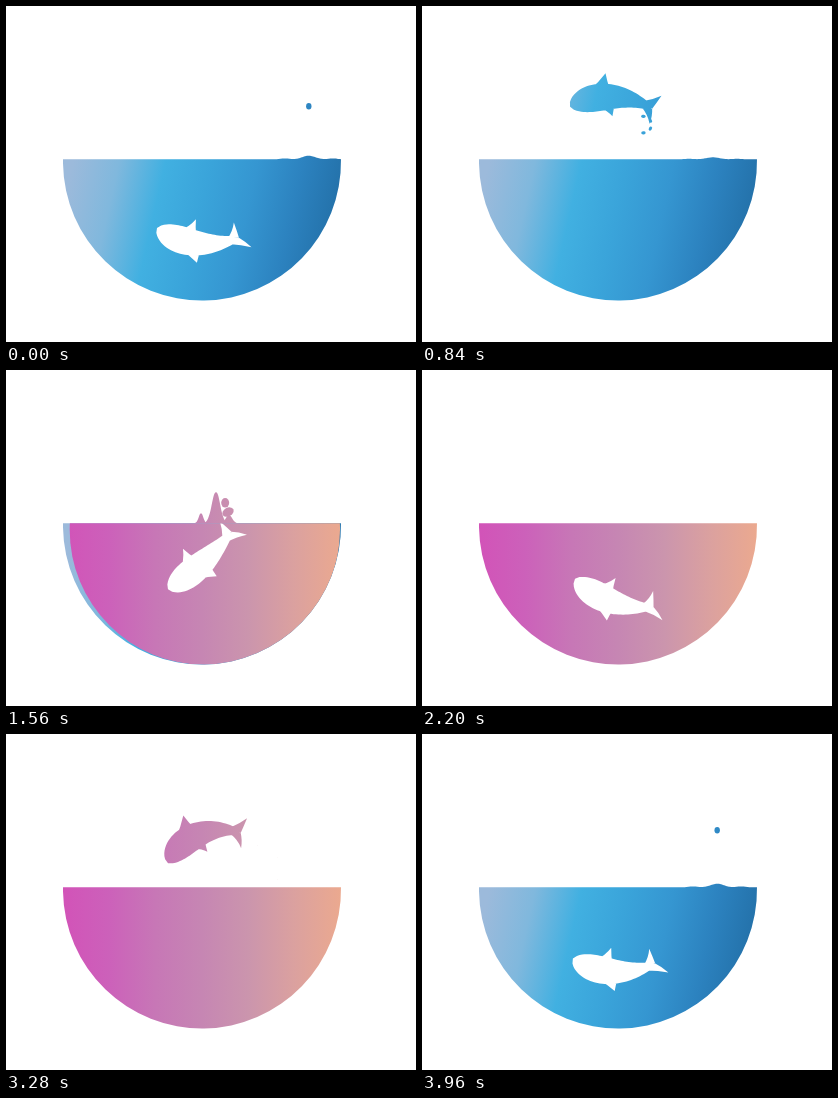
Recreate the animation shown at these times as an HTML page with a canvas. Size 410 by 336 pixels, loop 4000 ms.

```html
<!DOCTYPE html>
<html lang="en">
<head>
<meta charset="utf-8">
<title>Jumping fish</title>
<style>
  html, body { margin: 0; width: 100%; height: 100%; overflow: hidden; background: #fff; }
  canvas { display: block; width: 410px; height: 336px; }
</style>
</head>
<body>
<canvas id="stage" width="410" height="336"></canvas>
<script>
const ctx = document.getElementById('stage').getContext('2d');
const LOOP = 4000, CYCLE = 2000, START = 480;
const BOWL = { x: 196, y: 155.5, r: 139 };
const LEFT = 57, RIGHT = 335, LEVEL = 153.3;
const SPINE = 85;

const clamp = v => Math.max(0, Math.min(1, v));
const lerp = (a, b, p) => a + (b - a) * p;
const bell = (d, width) => Math.exp(-((d / width) ** 2));
const arch = (t, from, length) => Math.sin(Math.PI * clamp((t - from) / length));

// Evenly spaced colours across the bowl, tilted by an angle
function gradient(tilt, ...colors) {
  const c = Math.cos(tilt), s = Math.sin(tilt), width = RIGHT - LEFT;
  const g = ctx.createLinearGradient(LEFT, 200, LEFT + width * c * c, 200 + width * c * s);
  colors.forEach((color, i) => g.addColorStop(i / (colors.length - 1), color));
  return g;
}
const BLUE = gradient(0.22, '#9cbadb', '#80b8dd', '#41b0e1', '#3aa4da', '#3596d1', '#2c82bf', '#2370a8');
const PINK = gradient(0, '#d253b8', '#cc61ba', '#c777b6', '#c686b3', '#cb95ad', '#dba19f', '#eba98f');

// Turning points of the swim: time, nose x, nose y, heading and bend in degrees
const POSES = [
  [480, 153, 148, 41, 0],
  [560, 148, 104, 25, 20],
  [900, 149, 103, -3, 65],
  [1280, 162, 129, -23, 82],
  [1560, 162, 219, -42, -18],
  [1730, 152, 237, -18, -50],
  [2000, 151, 222, 7, -56],
  [2200, 153, 209, 20, -48]
];

function keyPose(i) {
  const n = POSES.length, turn = Math.floor(i / n);
  const [t, ...values] = POSES[i - turn * n];
  return [t + turn * CYCLE, ...values];
}

// Smooth periodic curve through the turning points
function poseAt(t) {
  let i = 0;
  while (t >= keyPose(i + 1)[0]) i++;
  const [before, a, b, after] = [-1, 0, 1, 2].map(step => keyPose(i + step));
  const span = b[0] - a[0], p = (t - a[0]) / span;
  return [1, 2, 3, 4].map(k => {
    const leave = (b[k] - before[k]) / (b[0] - before[0]);
    const arrive = (after[k] - a[k]) / (after[0] - a[0]);
    return lerp(a[k], b[k], p * p * (3 - 2 * p)) + span * p * (1 - p) * ((1 - p) * leave - p * arrive);
  });
}

function fishPath(t) {
  const [x, y, heading, curl] = poseAt(t);
  const angle = heading * Math.PI / 180, bend = curl * Math.PI / 180;
  const path = new Path2D();

  // The spine is a circular arc; "across" points to the back
  const place = (along, across) => {
    const q = along / SPINE, half = bend * q / 2;
    const reach = Math.abs(half) < 1e-4 ? along : along * Math.sin(half) / half;
    const ray = angle - bend / 2 + half, tangent = ray + half;
    return [
      x + reach * Math.cos(ray) + across * Math.sin(tangent),
      y + reach * Math.sin(ray) - across * Math.cos(tangent)
    ];
  };
  const fin = (a, tip, b) => {
    const pull = base => place(lerp(base[0], tip[0], 0.6), lerp(base[1], tip[1], 0.4));
    path.moveTo(...place(...a));
    path.quadraticCurveTo(...pull(a), ...place(...tip));
    path.quadraticCurveTo(...pull(b), ...place(...b));
    path.closePath();
  };
  const girth = q => 12.8 * Math.sin(Math.PI * q ** 0.6) + 2.5 * q;

  path.moveTo(x, y);
  for (let i = 1; i <= 40; i++) path.lineTo(...place(SPINE * i / 40, girth(i / 40)));
  for (let i = 40; i > 0; i--) path.lineTo(...place(SPINE * i / 40, -girth(i / 40)));
  path.closePath();
  fin([23, 9], [38, 23.5], [41, 9]);
  fin([47, -8], [45, -19.5], [30, -10]);
  fin([75, 3], [87, 16], [86, 0]);
  fin([86, 0], [93, -14], [75, -3]);
  return path;
}

const dropX = t => 219 + 0.19 * (t - 1560);
const dropY = t => t < 1950
  ? 96 + 37 * ((1950 - t) / 390) ** 2
  : 96 + 0.0016 * (t - 1950) ** 2;

const ripple = (d, height) => height * (bell(d, 9) + 0.25 * bell(Math.abs(d) - 24, 6));

function waterPath(t) {
  const leaving = 2 * clamp((t - 580) / 100) * clamp((1060 - t) / 60);
  const diving = 3.6 * clamp((t - 1640) / 120) * clamp((2180 - t) / 40);
  const edge = Math.asin((LEVEL - BOWL.y) / BOWL.r);
  const path = new Path2D();
  for (let x = LEFT; x <= RIGHT; x++) {
    path.lineTo(x, LEVEL - ripple(x - 215 - 0.27 * (t - 560), leaving) - ripple(x - dropX(t), diving));
  }
  path.arc(BOWL.x, BOWL.y, BOWL.r, edge, Math.PI - edge);
  path.closePath();
  return path;
}

function spike(x, width, height) {
  ctx.beginPath();
  ctx.moveTo(x - width, LEVEL);
  ctx.bezierCurveTo(x - width / 3, LEVEL, x - width / 3, LEVEL - height, x, LEVEL - height);
  ctx.bezierCurveTo(x + width / 3, LEVEL - height, x + width / 3, LEVEL, x + width, LEVEL);
  ctx.fill();
}

function blob(x, y, rx, ry, turn = 0) {
  ctx.beginPath();
  ctx.ellipse(x, y, rx, ry, turn, 0, 2 * Math.PI);
  ctx.fill();
}

function exitSplash(t) {
  const rise = arch(t, 500, 220);
  spike(178, 9, 12 * rise);
  spike(192, 11, 20 * rise);
  if (t < 600 || t > 1290) return;

  // Spray opens into a half ring while it thins out
  const p = (t - 600) / 640, size = lerp(2.6, 1.6, p) * clamp((1290 - t) / 50);
  for (let a = -1.5; a < 2; a++) {
    const x = lerp(205, 247 + 23 * Math.cos(a), p);
    const y = lerp(150, 129 + 22 * Math.sin(a), p) - 100 * p * (1 - p);
    blob(x, y, size, size * lerp(0.9, 0.35, p), a + Math.PI / 2);
  }
}

function diveSplash(t) {
  const rise = arch(t, 1400, 320);
  spike(195, 7, 10 * rise);
  spike(210, 13, 31 * rise);
  spike(223, 10, 8 * rise);
  if (t > 1480) blob(222, 142 + (t - 1560) * 0.09, 6 * rise, 4.3 * rise, -0.5);
  if (t > 1500 && t < 2150) {
    const size = lerp(4, 2.7, clamp((t - 1560) / 240));
    blob(dropX(t), dropY(t), size, size * 1.2);
  }
}

function draw(time) {
  const elapsed = time + CYCLE - START;
  const t = elapsed % CYCLE + START;
  const [before, after] = Math.floor(elapsed / CYCLE) % 2 ? [BLUE, PINK] : [PINK, BLUE];
  const fish = fishPath(t), water = waterPath(t);
  const spread = clamp((t - 1380) / 200);

  ctx.fillStyle = '#fff';
  ctx.fillRect(0, 0, 410, 336);

  // Above the surface the fish takes the colour of the water
  if (t > 500 && t < 1560) {
    ctx.save();
    ctx.beginPath();
    ctx.rect(0, 0, 410, LEVEL);
    ctx.clip();
    ctx.fillStyle = spread > 0 ? after : before;
    ctx.fill(fish);
    ctx.restore();
  }

  ctx.fillStyle = spread < 1 ? before : after;
  ctx.fill(water);
  ctx.save();
  ctx.clip(water);
  if (spread > 0 && spread < 1) {
    const r = BOWL.r * spread ** 0.28;
    ctx.fillStyle = after;
    blob(BOWL.x + 30 * (1 - spread), BOWL.y + 45 * (1 - spread), r, r);
  }
  ctx.fillStyle = '#fff';
  ctx.fill(fish);
  ctx.restore();

  ctx.fillStyle = before;
  exitSplash(t);
  ctx.fillStyle = after;
  diveSplash(t);
}

const begin = performance.now();
function tick() {
  draw((performance.now() - begin) % LOOP);
  requestAnimationFrame(tick);
}
tick();
</script>
</body>
</html>
```
